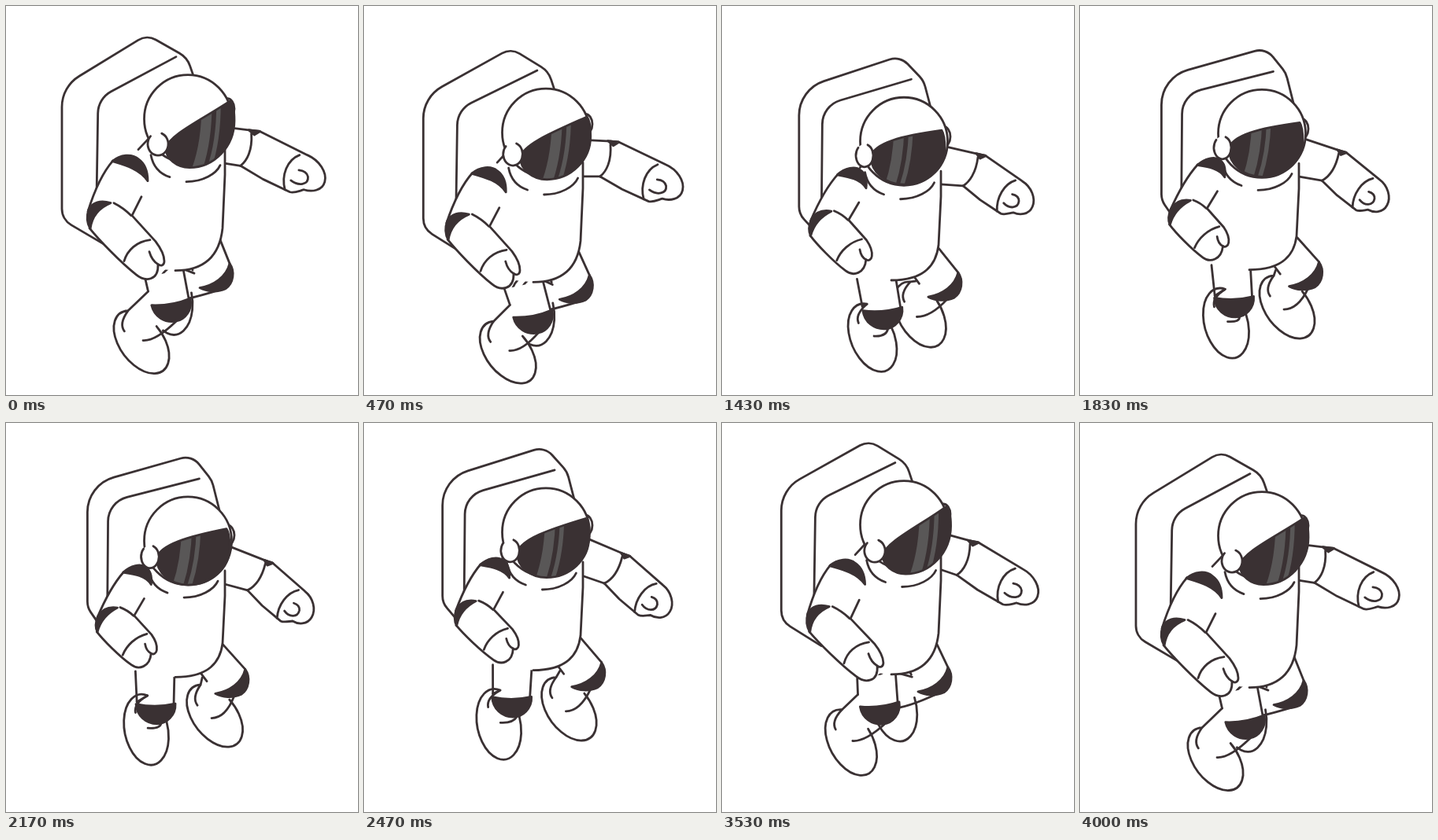
Recreate the animation shown at these times as an HTML page with a canvas. Size 447 by 495 pixels, loop 4.03 s.

```html
<!DOCTYPE html>
<html lang="en">
<head>
<meta charset="utf-8">
<title>Floating astronaut</title>
<style>
  html, body { margin: 0; width: 100%; height: 100%; overflow: hidden; background: #fff; }
  canvas { display: block; width: 447px; height: 495px; }
</style>
</head>
<body>
<canvas id="stage"></canvas>
<script>
const W = 447, H = 495, LOOP = 4030, PERIOD = 4000;
const INK = '#3a3133', GLARE = '#595757', WHITE = '#fff';
const canvas = document.getElementById('stage');
const ctx = canvas.getContext('2d');
const dpr = window.devicePixelRatio || 1;
canvas.width = W * dpr;
canvas.height = H * dpr;

// Every motion is one swing per loop around a mean
let cos, sin, turn;
const wave = (mean, c, s) => mean + c * cos + s * sin;
const point = (x, y) => ({ x: wave(...x), y: wave(...y) });
const shift = (p, dx, dy) => ({ x: p.x + dx, y: p.y + dy });

const xy = p => `${p.x} ${p.y} `;
const line = (...pts) => new Path2D('M' + pts.map(xy).join('L'));

function fill(path, color = WHITE) {
  ctx.fillStyle = color;
  ctx.fill(path);
}
function ink(path) { ctx.stroke(path); }
function outlined(path) { fill(path); ink(path); }
function solid(path) { fill(path, INK); ink(path); }

function place(d, matrix) {
  const path = new Path2D();
  path.addPath(new Path2D(d), matrix);
  return path;
}
function oval(x, y, rx, ry, from = 0, to = 7) {
  const path = new Path2D();
  path.ellipse(x, y, rx, ry, 0, from, to);
  return path;
}

// Polyline with rounded corners; each corner is x, y, travel while turning, radius
function rounded(corners) {
  const path = new Path2D();
  const pts = corners.map(([x, y, dx, dy, r]) => ({ x: x + dx * turn, y: y + dy * turn, r }));
  path.moveTo(pts[0].x, pts[0].y);
  pts.slice(1, -1).forEach((p, i) => path.arcTo(p.x, p.y, pts[i + 2].x, pts[i + 2].y, p.r));
  const end = pts[pts.length - 1];
  path.lineTo(end.x, end.y);
  return path;
}

function pack() {
  outlined(rounded([
    [127, 305, -7, -53],
    [71, 272, 33, -44, 24],
    [71, 103, 33, -31, 46],
    [179, 37, 58, -2, 22],
    [230, 66, 32, 1, 30],
    [240, 95, 32, 12]
  ]));
  ink(rounded([[216, 65, 30, 0], [117, 118, 13, -24, 32], [115, 245, 14, -23]]));
}

function farArm() {
  const elbow = { x: 305 + 13 * turn, y: 185 + 5 * turn - 6.5 * sin };
  const m = new DOMMatrix()
    .translate(elbow.x, elbow.y)
    .rotate(24 + 13.5 * turn - 4 * sin)
    .scale(1 - .2 * turn, 1 - .06 * turn);
  const top = m.transformPoint({ x: -4, y: -27 }), low = m.transformPoint({ x: 1, y: 20 });
  const upper = { x: 274, y: 154 - 7 * turn }, under = { x: 274, y: 200 - 2 * turn };
  fill(line(upper, top, low, under));
  outlined(place('M-4 -27 L5 -30 L73 -27 C90 -27 105 -17 107 -5 C109 7 97 14 87 15'
    + ' C82 19 78 24 72 25 L34 24 L1 20', m));
  ink(line(upper, top));
  ink(line(under, low));
  ink(place('M-3 -23 C7 -4 6 11 1 20', m));
  ink(place('M64 -23 C52 -11 53 10 65 25', m));
  ink(place('M67 11 C79 14 90 7 85 -2 C82 -6 77 -7 71 -5', m));
  solid(place('M-8 -26 L6 -30 L1 -23 Z', m));
}

function boot(foot, tilt, ankle, limb) {
  const rot = -tilt * Math.PI / 180;
  const outline = line(ankle);
  outline.ellipse(foot.x, foot.y, 27.5, 45.5, rot, 5.1, -.1, true);
  fill(outline);
  fill(limb);
  ink(outline);
  ink(place('M10 -42 Q-9 -36 -9 -24', new DOMMatrix().translate(foot.x, foot.y).rotate(-tilt)));
}

function farLeg() {
  const hip = point([274, -2, 0], [287, 11, 0]);
  const knee = point([256, -10, -.5], [348.5, 10.5, 0]);
  const inner = point([241, -5, -1.5], [322, 11.5, 0]);
  const foot = point([237, -28, -4], [369.5, 4, -3.5]);
  const calf = shift(knee, 24, 3), cap = shift(knee, 38, -31);
  boot(foot, wave(23, -15, -3), shift(inner, 3, 7), line(hip, cap, calf, foot, inner));
  ink(new Path2D(`M${xy(shift(foot, -4, 3))}Q${xy(shift(foot, 14, 3))}${xy(calf)}`));
  ink(line(inner, shift(inner, 1 + 8 * turn, 3 + 9 * turn)));
  ink(line(hip, cap));
  solid(place('M0 0 C18 -3 34 -14 38 -31 C45 -21 43 -6 33 1 C22 6 9 5 0 0 Z',
    new DOMMatrix().translate(knee.x, knee.y)));
}

function nearLeg() {
  const hipL = point([171, 5.5, 5], [328, 18, 3]);
  const hipR = point([220, 5, 5], [325, 10, 0]);
  const knee = point([201, 8.5, 10.5], [364.5, 12.7, 1.5]);
  const bend = point([174.5, 6, 9.5], [356.5, 7, 2.5]);
  const foot = point([177, -5, 14], [406, 22, 2]);
  const m = new DOMMatrix().translate(knee.x, knee.y).rotate(wave(-4.5, -4.5, -3));
  const side = m.transformPoint({ x: 23, y: 0 });
  boot(foot, wave(25, 12, 7), bend, line(hipL, bend, foot, shift(foot, 26, -15), side, hipR));
  ink(line(hipL, bend));
  ink(line(hipR, side));
  ink(new Path2D(`M${xy(shift(foot, 2, -2))}Q${xy(shift(foot, 18, -1))}${xy(shift(knee, 7, 24))}`));
  solid(place('M-25 0 Q0 5 25 -1 C26 14 14 25 2 25 C-12 25 -24 15 -25 0 Z', m));
}

function torso() {
  // The hem rises as the body turns
  const hem = y => y - 20 * turn * ((y - 180) / 157) ** 2;
  const front = `M278 182 L278 ${hem(215)} L275 ${hem(283)} C272 ${hem(312)} 258 ${hem(337)} 215 ${hem(337)}`;
  fill(new Path2D(`${front} L177 ${hem(333)} L163 ${hem(268)} L168 186 Z`));
  ink(new Path2D(front));
  ink(place('M184 190 C187 206 196 214 208 218 M229 224 C250 224 267 214 272 203',
    new DOMMatrix().translate(-3 * turn, -8 * turn)));
  ink(line({ x: 184, y: 166 }, { x: 168 + 9 * turn, y: 183 - 7 * turn }));
}

function nearArm() {
  const swing = sin * (5 * sin - 6) / 150;
  const m = new DOMMatrix([
    1 - .155 * turn, -.13 * turn, swing - .12 * turn, 1 - .16 * turn,
    136 + 14 * turn, 197 - 14 * turn
  ]).translate(-136, -197);
  const arm = d => place(d, m);
  fill(arm('M136 197 C122 213 112 236 104 262 L107 284 L160 268 L172 243 L180 223 C178 205 168 192 150 191 Z'));
  ink(arm('M136 197 C122 213 112 236 104 262'));
  outlined(arm('M106 283 C118 298 145 326 165 342 C177 352 194 350 193 329'
    + ' C197 332 201 330 201 325 C201 318 196 308 190 300 L160 267 L172 243'));
  ink(arm('M193 329 C188 326 184 320 182 313'));
  ink(arm('M150 325 C154 311 166 300 183 298'));
  ink(arm('M137 251 Q149 257 159 267'));
  solid(arm('M135 198 C145 189 160 188 168 195 C178 202 180 213 180 223 C170 208 152 203 135 198 Z'));
  solid(arm('M133 251 C120 247 110 250 105 259 C102 268 103 277 107 284 C109 268 118 257 133 251 Z'));
}

// Elliptic quarters: flat start or upright start
const flat = (a, b) =>
  `C${a.x + (b.x - a.x) * .55} ${a.y} ${b.x} ${b.y - (b.y - a.y) * .55} ${xy(b)}`;
const upright = (a, b) =>
  `C${a.x} ${a.y + (b.y - a.y) * .55} ${b.x - (b.x - a.x) * .55} ${b.y} ${xy(b)}`;

function head() {
  const nod = wave(.47, -.47, .3);
  outlined(oval(281, 131 + 7 * nod, 9, 13));
  outlined(oval(231, 144, 55.5, 56));

  const left = { x: 203 - 14 * nod, y: 181 - 18 * nod };
  const right = { x: 285 - 6 * nod, y: 121 + 9 * nod };
  const side = { x: 290 - 7 * nod, y: 146 + 8 * nod };
  const chin = { x: 233 - 2 * nod, y: 206 - 7 * nod };
  const brow = shift(right, -38 - 14 * nod, 25 - 18 * nod);
  const visor = new Path2D(`M${xy(left)}C${xy(shift(left, 5, -17))}${xy(brow)}${xy(right)}`
    + `Q${side.x} ${right.y + 6} ${xy(side)}${upright(side, chin)}${flat(chin, left)}Z`);
  fill(visor, INK);
  ctx.save();
  ctx.clip(visor);
  ctx.strokeStyle = GLARE;
  ctx.translate(-30 * nod, -6 * nod);
  const shine = new Path2D('M255 125 Q255 178 240 215');
  ctx.lineWidth = 13;
  ink(shine);
  ctx.translate(15, 0);
  ctx.lineWidth = 5.5;
  ink(shine);
  ctx.restore();
  ink(visor);

  const ear = [193 - 12 * nod, 176 - 14 * nod, 13 - 2 * nod, 14.5];
  fill(oval(...ear));
  ink(oval(...ear, -1.2, 3.9));
}

function draw(t) {
  const angle = t / PERIOD * 2 * Math.PI;
  cos = Math.cos(angle);
  sin = Math.sin(angle);
  turn = (1 - cos) / 2;

  ctx.setTransform(dpr, 0, 0, dpr, 0, 0);
  ctx.fillStyle = WHITE;
  ctx.fillRect(0, 0, W, H);
  ctx.strokeStyle = INK;
  ctx.lineWidth = 2.8;
  ctx.lineCap = ctx.lineJoin = 'round';

  ctx.translate(0, wave(6, -6.4, 23.4));
  pack();
  farArm();
  farLeg();
  nearLeg();
  torso();
  nearArm();
  head();
}

const start = performance.now();
function tick() {
  draw(Math.min((performance.now() - start) % LOOP, PERIOD));
  requestAnimationFrame(tick);
}
tick();
</script>
</body>
</html>
```
